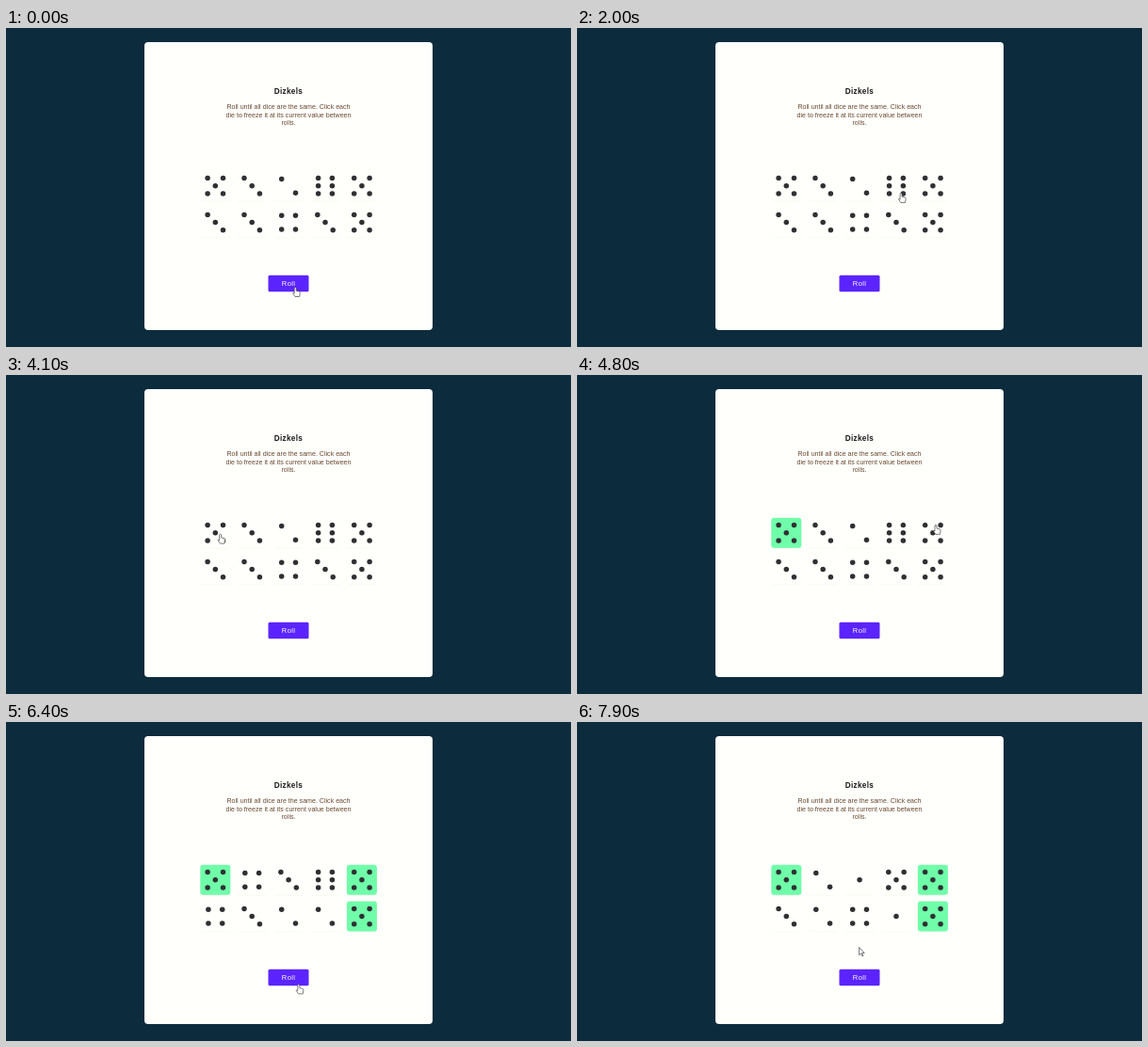
Recreate the animation shown at these times as an HTML page. Size 600 px wide and 339 px high, loop 8 s.

```html
<!DOCTYPE html>
<html lang="en">
<head>
<meta charset="utf-8">
<title>Dizkels</title>
<style>
  html, body { margin: 0; width: 100%; height: 100%; overflow: hidden; background: #0c2b3c; }
  svg { display: block; width: 600px; height: 339px; }
  text { font-family: "Liberation Sans", Arial, sans-serif; text-anchor: middle; }
  .title { font-size: 8.2px; font-weight: 700; letter-spacing: .3px; fill: #1c1a17; }
  .help { font-size: 7.08px; fill: #68482f; }
  .label { font-size: 7.6px; letter-spacing: .3px; fill: #fff; }
  .die { fill: #fffffc; }
  .held { fill: #70fdaa; }
  .shade { fill: #f8f8f1; }
  .pip { fill: #303033; }
</style>
</head>
<body>
<svg viewBox="0 0 600 339">
  <rect x="147" y="15" width="306" height="306" rx="4" fill="#fffffc"/>
  <text class="title" x="300" y="70.4">Dizkels</text>
  <text class="help" x="300" y="86.4">Roll until all dice are the same. Click each</text>
  <text class="help" x="300" y="94.8">die to freeze it at its current value between</text>
  <text class="help" x="300" y="103.2">rolls.</text>
  <g id="dice"></g>
  <rect x="278.5" y="262.7" width="43" height="17.6" rx="1.6" fill="#5b24ff"/>
  <text class="label" x="300" y="274">Roll</text>
  <g id="cursor" fill="#fff" stroke="#444" stroke-width=".7" stroke-linejoin="round">
    <path id="hand" d="M-1 1Q0-.6 1 1V4L4 4.7Q5.2 5 5.1 6.3L4.4 10.3H-.2L-2.6 6.8Q-2.6 5.5-1 6.8Z"/>
    <path id="arrow" d="M0 0V8.2L1.9 6.5L3.2 9.5L4.4 9L3.1 6.1H5.6Z"/>
  </g>
</svg>
<script>
const LOOP = 8000, STEP = 100;
const SVG = "http://www.w3.org/2000/svg";
const $ = id => document.getElementById(id);

// Values shown from each roll on
const rolls = [
  { at: 0, values: "5326533435" },
  { at: 6200, values: "5436543225" },
  { at: 7500, values: "5215532415" }
];
// Die index -> time it is frozen
const holds = { 0: 4200, 4: 4900, 9: 5400 };

// Cursor moves: start time, end time, where the tip comes to rest
const home = [307.2, 275.2];
const moves = [
  [1100, 1200, 308.6, 265.2],
  [1200, 1500, 341, 186],
  [1700, 2800, 346, 168.6],
  [2800, 3200, 306, 227],
  [3200, 4000, 227.6, 168.8],
  [4200, 4800, 381, 159],
  [5000, 5400, 379, 212],
  [5700, 6200, 310.8, 278.6],
  [6400, 6600, 309, 271],
  [7500, 7900, 299.6, 239.4]
];

const wide = 8.2, near = 7.4;
const diagonal = d => [[-d, -d], [d, d]];
const corners = d => [...diagonal(d), [d, -d], [-d, d]];
const center = [[0, 0]];
const faces = {
  1: center,
  2: diagonal(near),
  3: [...diagonal(wide), ...center],
  4: corners(near),
  5: [...corners(wide), ...center],
  6: [-near, near].flatMap(x => [-wide, 0, wide].map(y => [x, y]))
};

function make(tag, attrs, parent) {
  const el = document.createElementNS(SVG, tag);
  for (const k in attrs) el.setAttribute(k, attrs[k]);
  return parent.appendChild(el);
}

const dice = Array.from({ length: 10 }, (_, i) => {
  const x = 222.3 + 38.9 * (i % 5), y = i < 5 ? 167.8 : 206.6;
  const g = make("g", { transform: `translate(${x} ${y})` }, $("dice"));
  const box = { x: -16, y: -16, width: 32, height: 32, rx: 3 };
  make("rect", { ...box, y: -15.4, class: "shade" }, g);
  return { x, y, box: make("rect", box, g), pips: make("g", { class: "pip" }, g), value: "" };
});

function setFace(die, value) {
  if (die.value === value) return;
  die.value = value;
  die.pips.replaceChildren();
  for (const [cx, cy] of faces[value]) make("circle", { cx, cy, r: 2.75 }, die.pips);
}

const easeOut = k => 1 - (1 - k) ** 3;

function cursorAt(t) {
  let [x, y] = home;
  for (const [from, to, toX, toY] of moves) {
    if (t < from) break;
    const k = easeOut(Math.min(1, (t - from) / (to - from)));
    x += (toX - x) * k;
    y += (toY - y) * k;
  }
  return [x, y];
}

function isClickable(x, y) {
  const onButton = x > 278 && x < 322 && y > 262 && y < 281;
  return onButton || dice.some(d => Math.abs(x - d.x) < 16 && Math.abs(y - d.y) < 16);
}

function draw(t) {
  const { values } = rolls.findLast(r => r.at <= t);
  dice.forEach((die, i) => {
    setFace(die, values[i]);
    die.box.setAttribute("class", t >= holds[i] ? "held" : "die");
  });
  const [x, y] = cursorAt(t);
  const hand = isClickable(x, y);
  $("cursor").setAttribute("transform", `translate(${x} ${y})`);
  $("hand").style.display = hand ? "" : "none";
  $("arrow").style.display = hand ? "none" : "";
}

const start = performance.now();
function tick() {
  const t = (performance.now() - start) % LOOP;
  draw(Math.floor(t / STEP) * STEP);
  requestAnimationFrame(tick);
}
tick();
</script>
</body>
</html>
```
